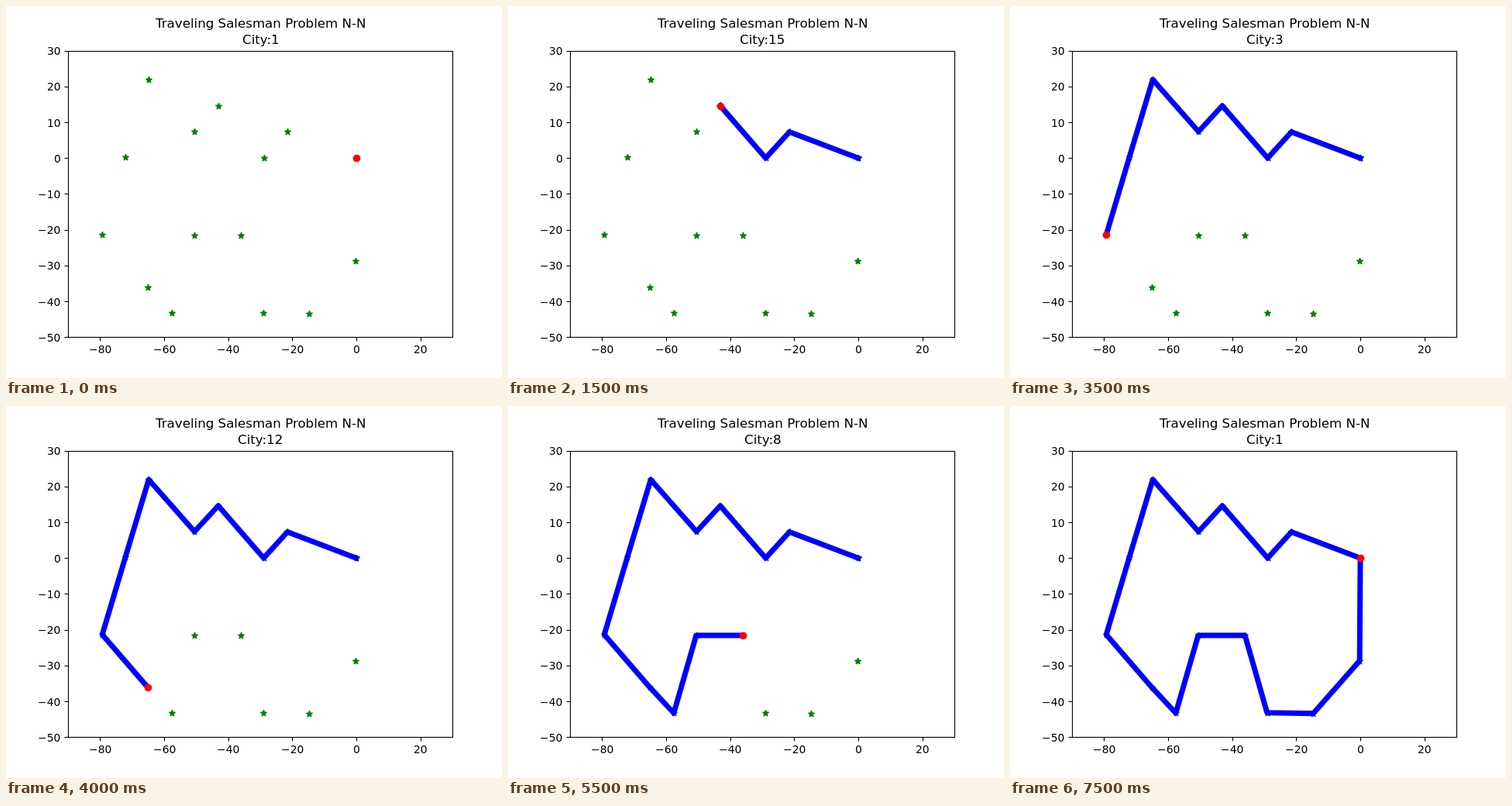
These frames come from a looping animation (640x480 px, 8 s). An HTML page with a canvas:

```html
<!DOCTYPE html>
<html lang="en">
<head>
<meta charset="utf-8">
<title>Nearest neighbour tour</title>
<style>
html, body { margin: 0; width: 100%; height: 100%; overflow: hidden; background: #fff; }
canvas { display: block; }
</style>
</head>
<body>
<canvas id="plot" width="640" height="480"></canvas>
<script>
const ctx = document.getElementById('plot').getContext('2d');
const STEP = 500;
const LEFT = 80, RIGHT = 576, TOP = 57.6, BOTTOM = 427.2;

const px = x => LEFT + (x + 90) / 120 * (RIGHT - LEFT);
const py = y => TOP + (30 - y) / 80 * (BOTTOM - TOP);
const crisp = v => Math.round(v) + 0.5;

// City positions in plot units, "x,y" in order of city number
const cities = ('0,0 -28.9,0 -79.3,-21.4 -14.7,-43.4 -64.8,21.9 -29.1,-43.2 -72.1,0.2 -36,-21.6 ' +
  '-50.5,7.4 -50.6,-21.6 -0.2,-28.7 -65.1,-36.1 -21.5,7.3 -57.6,-43.3 -43.1,14.6')
  .split(' ').map((pair, i) => {
    const [x, y] = pair.split(',').map(Number);
    return { id: i + 1, x, y };
  });
const tour = nearestNeighbour(cities);

// Always go on to the closest city not yet visited, then return home
function nearestNeighbour([home, ...left]) {
  const path = [home];
  while (left.length) {
    const here = path[path.length - 1];
    const dist = c => Math.hypot(c.x - here.x, c.y - here.y);
    left.sort((a, b) => dist(a) - dist(b));
    path.push(left.shift());
  }
  return [...path, home];
}

function line(x1, y1, x2, y2) {
  ctx.beginPath();
  ctx.moveTo(x1, y1);
  ctx.lineTo(x2, y2);
  ctx.stroke();
}

// align: 0.5 centres the text on x, 1 ends it there
function text(str, x, y, size, align) {
  ctx.font = size + 'px "DejaVu Sans", sans-serif';
  const start = x - ctx.measureText(str).width * align;
  ctx.fillText(str, Math.floor(start + 0.9), y);
}

function star({ x, y }) {
  ctx.beginPath();
  for (let i = 0; i < 10; i++) {
    const r = i % 2 ? 1.59 : 4.17, a = i * Math.PI / 5;
    ctx.lineTo(crisp(px(x)) + r * Math.sin(a), crisp(py(y)) - r * Math.cos(a));
  }
  ctx.closePath();
  ctx.fill();
  ctx.stroke();
}

function axes() {
  const label = n => String(n).replace('-', '\u2212');
  const top = crisp(TOP), bottom = crisp(BOTTOM);
  ctx.strokeStyle = ctx.fillStyle = '#000';
  ctx.lineWidth = 1.11;
  ctx.lineCap = 'butt';
  ctx.lineJoin = 'miter';
  ctx.strokeRect(LEFT + 0.5, top, RIGHT - LEFT, bottom - top);
  for (let v = -80; v <= 20; v += 20) {
    const x = crisp(px(v));
    line(x, bottom, x, bottom + 5);
    text(label(v), px(v), 448, 13.89, 0.5);
  }
  for (let v = -50; v <= 30; v += 10) {
    const y = crisp(py(v));
    line(LEFT + 0.5, y, LEFT - 4.5, y);
    text(label(v), 70.28, Math.round(py(v) + 5.5), 13.89, 1);
  }
}

function draw(now) {
  const step = Math.floor(now / STEP) % tour.length;
  const city = tour[step];

  ctx.fillStyle = '#fff';
  ctx.fillRect(0, 0, 640, 480);

  ctx.fillStyle = ctx.strokeStyle = '#008000';
  ctx.lineWidth = 1.39;
  ctx.lineJoin = 'bevel';
  cities.forEach(star);

  if (step > 0) {
    ctx.strokeStyle = '#00f';
    ctx.lineWidth = 6.94;
    ctx.lineCap = 'square';
    ctx.lineJoin = 'round';
    ctx.beginPath();
    for (const c of tour.slice(0, step + 1)) ctx.lineTo(px(c.x), py(c.y));
    ctx.stroke();
  }

  ctx.fillStyle = '#f00';
  ctx.beginPath();
  ctx.arc(crisp(px(city.x)), crisp(py(city.y)), 4.86, 0, 2 * Math.PI);
  ctx.fill();

  axes();
  text('Traveling Salesman Problem N-N', 328, 28, 16.67, 0.5);
  text('City:' + city.id, 328, 49, 16.67, 0.5);
  requestAnimationFrame(draw);
}
requestAnimationFrame(draw);
</script>
</body>
</html>
```
